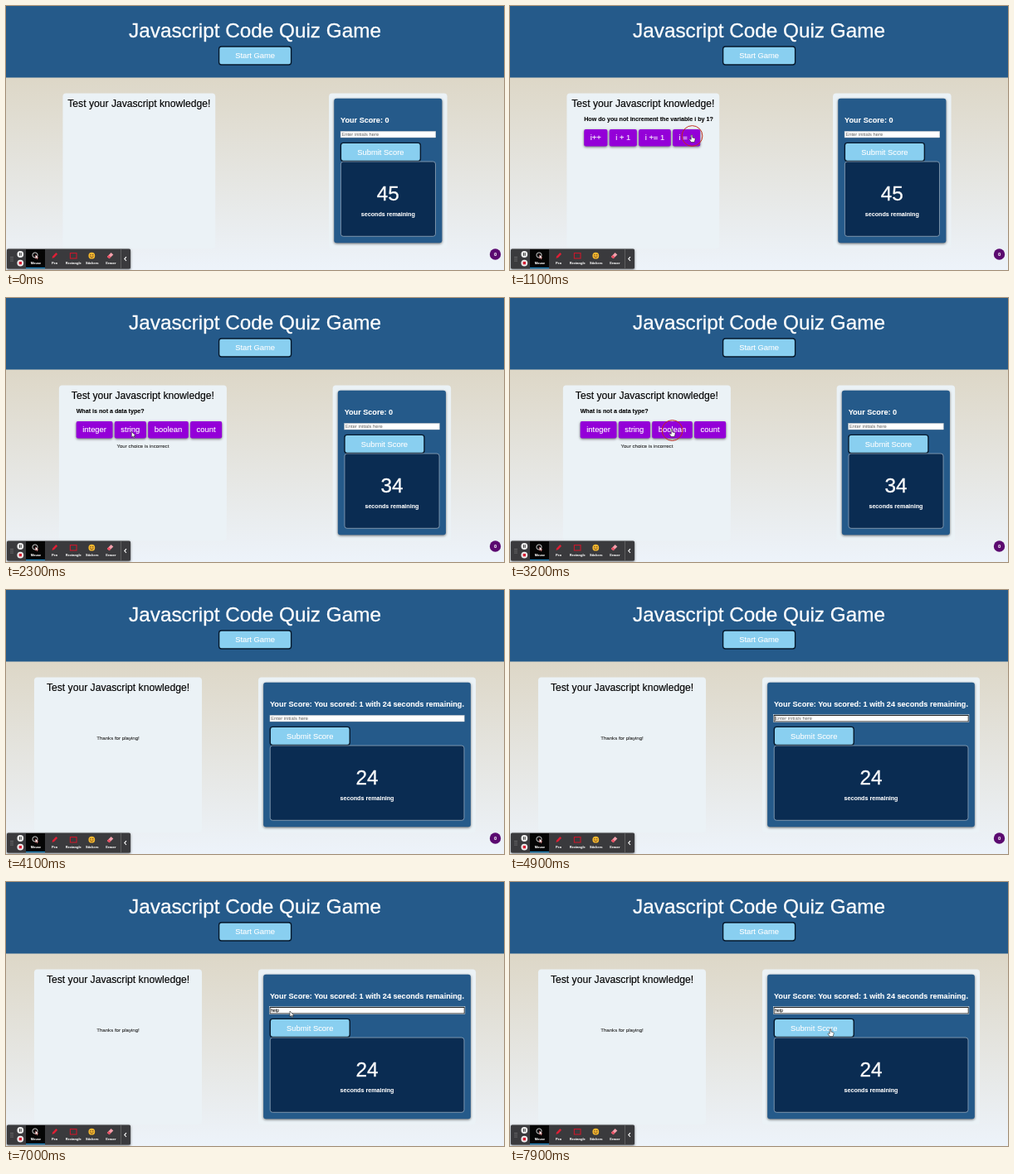
Recreate the animation shown at these times as an HTML page. Size 600x319 px, loop 8 s.

```html
<!DOCTYPE html>
<html lang="en">
<head>
<meta charset="utf-8">
<title>Javascript Code Quiz Game</title>
<style>
  html, body { margin: 0; width: 100%; height: 100%; overflow: hidden; }
  svg { display: block; width: 100vw; height: 100vh; font-family: "Liberation Sans", Arial, sans-serif; }
  .shadow { filter: drop-shadow(0 1px 1.5px rgba(0, 0, 0, .55)); }
</style>
</head>
<body>
<svg viewBox="0 0 600 319" preserveAspectRatio="none">
  <defs>
    <linearGradient id="page" x1="0" y1="0" x2="0" y2="1">
      <stop offset="0" stop-color="#ddd7c7"/><stop offset="1" stop-color="#edf3fa"/>
    </linearGradient>
  </defs>
  <rect y="86" width="600" height="233" fill="url(#page)"/>
  <rect width="600" height="86.5" fill="#255a8a"/>
  <g id="header"></g>
  <g id="game"></g>
  <g id="toolbar"></g>
  <g id="pointer"></g>
</svg>
<script>
const LOOP = 8000, STAGE = 600, CLICK = 200;
const BLUE = '#255a8a', SKY = '#89cff0', NAVY = '#0a2c52', CARD = '#ebf2f6';
const BOLD = 'font-weight="700"', MID = 'text-anchor="middle"', LABEL = MID + ' ' + BOLD;
const TITLE = 'Test your Javascript knowledge!';
const SIZE = { big: 24.3, title: 12.15, button: 9.4, score: 9.1, strong: 7.13, note: 6.12 };

const layer = id => document.getElementById(id);
const rect = (x, y, w, h, fill, extra = '') =>
  `<rect x="${x}" y="${y}" width="${w}" height="${h}" fill="${fill}" ${extra}/>`;
const circle = (x, y, r, fill, extra = '') =>
  `<circle cx="${x}" cy="${y}" r="${r}" fill="${fill}" ${extra}/>`;
const path = (d, extra) => `<path d="${d}" ${extra}/>`;
// A hairline outline gives the text a slightly heavier weight
const text = (s, x, y, size, fill, extra = '') =>
  `<text x="${x}" y="${y}" font-size="${size}" fill="${fill}" stroke="${fill}" stroke-width="${size * .012}" ${extra}>${s}</text>`;

const ruler = document.createElement('canvas').getContext('2d');
function textWidth(s, size, weight = 400) {
  ruler.font = `${weight} 100px "Liberation Sans", Arial, sans-serif`;
  return ruler.measureText(s).width * size / 100;
}

const skyButton = (label, x, y, w) =>
  rect(x, y, w, 22, SKY, 'rx="3" stroke="#06182b" stroke-width="1.4"') +
  text(label, x + w / 2, y + 14.2, SIZE.button, '#fff', MID);

// Every click on a button advances to the next screen
const screens = [
  { seconds: 45 },
  { seconds: 45, question: 'How do you not increment the variable i by 1?',
    answers: ['i++', 'i + 1', 'i += 1', 'i = 1'] },
  { seconds: 45, question: 'How do you add an element to an existing one?',
    answers: ['.append()', '.glue()', '.add()', '.createNewElement()'], note: 'Your choice is correct' },
  { seconds: 34, question: 'What is not a data type?',
    answers: ['integer', 'string', 'boolean', 'count'], note: 'Your choice is incorrect' },
  { seconds: 24, answers: ['integer', 'string', 'boolean', 'count'], hidden: true,
    note: 'Thanks for playing!', score: 'You scored: 1 with 24 seconds remaining.' },
];

// The pointer rests at each stop from arrive to leave
const stops = [
  { arrive: 100, leave: 100, x: 345, y: 120 },
  { arrive: 400, leave: 500, x: 300, y: 62, button: true },
  { arrive: 1000, leave: 1250, x: 219, y: 156, button: true },
  { arrive: 1650, leave: 2200, x: 149, y: 161.5, button: true },
  { arrive: 2950, leave: 3350, x: 195, y: 159, button: true },
  { arrive: 3900, leave: 7000, x: 342, y: 156 },
  { arrive: 7650, leave: LOOP + CLICK, x: 386, y: 178, button: true },
];
const FOCUS = 4500, TYPING = 4780, KEY = 330;

// Two cards share the free space evenly around them
const GAP = 2.3, INDENT = 20.8, PAD = 5.8;
const answerWidth = label => textWidth(label, SIZE.button) + 15.1;
for (const s of screens) {
  const { answers = [], score = '0' } = s;
  const row = answers.reduce((sum, a) => sum + answerWidth(a) + GAP, -GAP);
  s.heading = 'Your Score: ' + score;
  s.leftW = Math.max(textWidth(TITLE, SIZE.title) + 2 * PAD, INDENT + row + PAD);
  s.rightW = Math.max(142.5, textWidth(s.heading, SIZE.score, 700) + 27.8);
  const space = (STAGE - s.leftW - s.rightW) / 4;
  s.leftX = space;
  s.rightX = space * 3 + s.leftW;
}

const card = (x, w) => rect(x, 105.5, w, 187.5, CARD, 'rx="4"');

function quizCard({ leftX: x, leftW: w, question, answers = [], hidden, note }) {
  const mid = x + w / 2;
  let out = card(x, w) + text(TITLE, mid, 122.2, SIZE.title, '#000', MID);
  if (question) out += text(question, x + INDENT, 139, SIZE.strong, '#000', BOLD);
  let left = x + INDENT;
  for (const label of hidden ? [] : answers) {
    const width = answerWidth(label);
    out += rect(left, 149, width, 20.6, '#9400d8', 'rx="2" class="shadow"') +
      text(label, left + width / 2, 162.2, SIZE.button, '#fff', MID);
    left += width + GAP;
  }
  return note ? out + text(note, mid, 181.1, SIZE.note, '#222', MID) : out;
}

function field(x, w, t) {
  const focused = t >= FOCUS;
  const typed = 'help'.slice(0, Math.max(0, Math.floor((t - TYPING) / KEY)));
  let out = rect(x, 151.4, w, 7.6, '#fff', `stroke="${focused ? '#101010' : '#bbb'}" stroke-width="${focused ? 1 : .4}"`);
  if (focused) out += rect(x - .7, 150.7, w + 1.4, 9, 'none', 'stroke="#fff" stroke-width=".5"');
  out += typed ? text(typed, x + 1.2, 157, 5.1, '#000')
               : text('Enter initials here', x + 1.3, 157, 5.8, '#777');
  if (focused && t < 7000 && t % 1000 >= 500)
    out += rect(x + 1.5 + textWidth(typed, 5.1), 152.5, .5, 5.5, '#000');
  return out;
}

function scoreCard({ rightX: x, rightW: w, heading, seconds }, t) {
  const left = x + 14, inner = w - 27.8, mid = x + w / 2;
  return card(x, w) +
    rect(x + 6.2, 111.7, w - 12.4, 174.5, BLUE, 'rx="3" class="shadow"') +
    text(heading, left, 141.2, SIZE.score, '#fff', BOLD) +
    field(left, inner, t) +
    skyButton('Submit Score', left + .3, 165.4, 96) +
    rect(left + .3, 188, inner - .6, 90.3, NAVY, 'rx="3" stroke="#a5b5c4" stroke-width=".7"') +
    text(seconds, mid, 235.2, SIZE.big, '#fff', MID) +
    text('seconds remaining', mid, 254, SIZE.strong, '#fff', LABEL);
}

const HAND = 'M-.8 0Q0-1 .8 0V3L3.4 3.6Q4.3 4 4 5.5L3.2 8.6H-.8L-3 5.6Q-3 4.2-.8 5.3Z';
const ARROW = 'M0 0V7L1.7 5.5 2.8 8 3.8 7.5 2.8 5.2H5Z';
const cursor = (shape, x, y) =>
  path(shape, `transform="translate(${x} ${y})" fill="#fff" stroke="#222" stroke-width=".6"`);

function pointer(t) {
  const i = stops.findIndex(s => t < s.leave), to = stops[i], from = stops[i - 1];
  if (!from) return '';
  if (t < to.arrive) {
    const p = (t - from.leave) / (to.arrive - from.leave), ease = p * p * (3 - 2 * p);
    return cursor(ARROW, from.x + (to.x - from.x) * ease, from.y + (to.y - from.y) * ease);
  }
  if (!to.button) return '';
  const ring = t >= to.leave - CLICK
    ? circle(to.x + .5, to.y + 1, 12.4, 'none', 'stroke="#c0301f" stroke-width="1"') : '';
  return ring + cursor(HAND, to.x, to.y);
}

const tools = {
  Mouse: circle(-1, -1, 3.1, 'none', 'stroke="#fff" stroke-width=".8"') +
    path(ARROW, 'transform="translate(-.5 -1.5) scale(.7)" fill="#fff" stroke="#c22" stroke-width=".4"'),
  Pen: path('M-3.2 3-2.3.2 1.7-4 3.5-2.2-.5 2Z', 'fill="#e01f35"'),
  Rectangle: rect(-3.8, -3.4, 7.6, 6.4, 'none', 'stroke="#c9182b" stroke-width="1.1"'),
  Stickers: circle(-.5, -.3, 3.9, '#f5b82e') + circle(-1.8, -1.3, .6, '#422') + circle(.9, -1.3, .6, '#422') +
    path('M-2.6.6Q-.5 3 1.6.6', 'fill="none" stroke="#422" stroke-width=".7"'),
  Eraser: path('M-4.6 1 .2-4 2.9-1.6-1.9 3.3Z', 'fill="#f2a0ac"') +
    path('M-4.6 1-2.7-1 0 1.4-1.9 3.3Z', 'fill="#e84f62"'),
};

function toolbar() {
  let out = rect(1, 293.5, 149, 24, '#3a3a3d', 'rx="1.5" class="shadow"') +
    rect(24, 294, 23, 23, '#050505') + rect(24, 316, 23, 1.1, '#2196d8') +
    rect(138, 294, .6, 23, '#777');
  for (let i = 0; i < 6; i++) out += circle(6 + i % 2 * 2, 303.5 + (i >> 1) * 2.2, .5, '#aaa');
  out += circle(17.3, 300, 3.9, '#eee') + rect(15.9, 298.2, 1, 3.6, '#333') + rect(17.7, 298.2, 1, 3.6, '#333') +
    circle(17.3, 310.6, 3.9, '#eee') + rect(15.6, 308.9, 3.4, 3.4, '#d92136');
  Object.entries(tools).forEach(([name, icon], i) => {
    const x = 36 + i * 22.6;
    out += `<g transform="translate(${x} 302)">${icon}</g>` + text(name, x, 311.5, 4, '#fff', LABEL);
  });
  return out + path('M145 303.2 142.8 305.6 145 308', 'fill="none" stroke="#fff" stroke-width="1.1"');
}

const badge = () => circle(589.5, 300, 6.7, '#5b0a70') + text('0', 589.5, 302.1, 5.8, '#fff', LABEL);

layer('header').innerHTML =
  text('Javascript Code Quiz Game', STAGE / 2, 37.5, SIZE.big, '#fff', MID) + skyButton('Start Game', 256.6, 49, 87);
layer('toolbar').innerHTML = toolbar();

function draw(t) {
  const screen = screens[stops.filter(s => s.button && s.leave <= t).length];
  layer('game').innerHTML = quizCard(screen) + scoreCard(screen, t) + (t < 6500 ? badge() : '');
  layer('pointer').innerHTML = pointer(t);
}

const start = performance.now();
function frame() {
  draw((performance.now() - start) % LOOP);
  requestAnimationFrame(frame);
}
frame();
</script>
</body>
</html>
```
